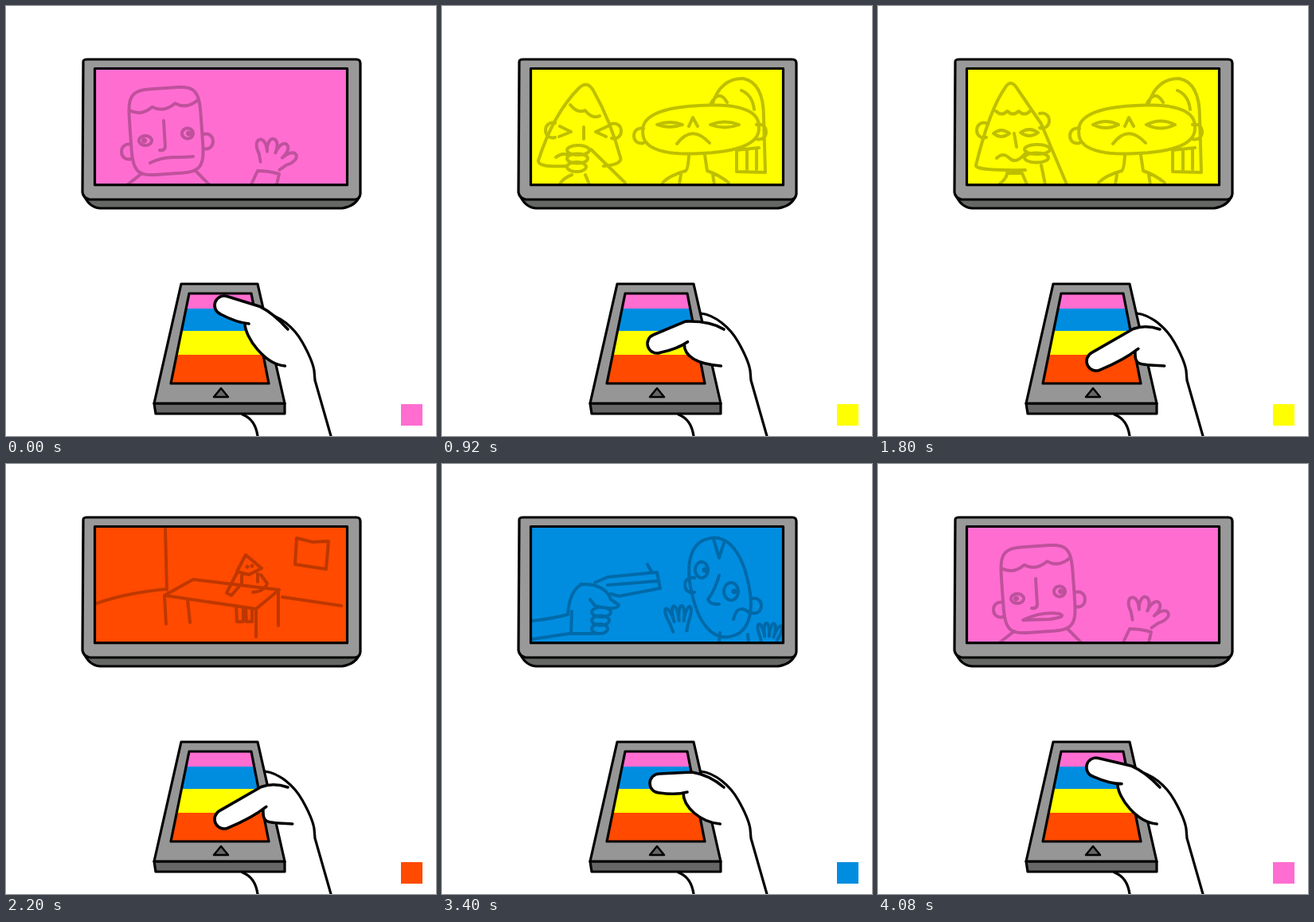
An HTML page for the animation above (4.16 s loop, 540x540 px).

```html
<!DOCTYPE html>
<html lang="en">
<head>
<meta charset="utf-8">
<title>Remote and screen</title>
<style>
html, body { margin: 0; width: 100%; height: 100%; overflow: hidden; background: #fff; }
svg { display: block; width: 100vw; height: 100vh; }
path { stroke-linecap: round; stroke-linejoin: round; }
.ink { stroke: #000; stroke-width: 3.2; fill: none; }
#scenes { fill: none; stroke: #000; stroke-width: 4; opacity: .25; }
</style>
</head>
<body>
<svg viewBox="0 0 540 540">
  <clipPath id="tvClip"><path d="M111 78.5H428.5V225H111Z"/></clipPath>
  <clipPath id="phoneClip"><path d="M230 361H308L330 474H207Z"/></clipPath>

  <path class="ink" style="fill:#656865" d="M97 236Q104 253 118 254H422Q440 251 444 238Z"/>
  <path class="ink" style="fill:#999" d="M97 70Q97 67 102 67H440Q445 67 445 72V236Q444 243 438 243H105Q97 241 96 234Z"/>
  <g clip-path="url(#tvClip)">
    <rect id="screen" x="111" y="78" width="318" height="148"/>
    <g id="scenes"></g>
  </g>
  <path class="ink" d="M111.5 78.5H428.5V224.7H111.5Z"/>

  <path class="ink" d="M325 386C343 388 362 404 372 422Q385 445 387 458L388 470 408 540M297 513Q313 519 316 540"/>
  <path class="ink" style="fill:#666" d="M186 499H350V512H188Z"/>
  <path class="ink" style="fill:#969696" d="M220 349H316L350 499H186Z"/>
  <g id="bands" clip-path="url(#phoneClip)"></g>
  <path class="ink" d="M230 361H308L330 474H207Z"/>
  <path class="ink" style="fill:#666;stroke-width:2.5" d="M270 480L279 491H261Z"/>
  <path id="thumbFill" fill="#fff"/>
  <path id="thumb" class="ink" style="stroke-width:3.6"/>
  <rect id="badge" x="496" y="500" width="27" height="27"/>
</svg>
<script>
const $ = id => document.getElementById(id);
const rad = Math.PI / 180;

function make(tag, parent, attrs = {}) {
  const el = parent.appendChild(document.createElementNS('http://www.w3.org/2000/svg', tag));
  for (const name in attrs) el.setAttribute(name, attrs[name]);
  return el;
}

// Shape helpers return path data

// Superellipse: power 2 is an oval, higher is boxier
function blob(x, y, rx, ry, power = 2, turn = 0) {
  const bend = v => Math.sign(v) * Math.abs(v) ** (2 / power);
  const c = Math.cos(turn * rad), s = Math.sin(turn * rad);
  let d = '';
  for (let a = 0; a < 360; a += 6) {
    const px = rx * bend(Math.cos(a * rad)), py = ry * bend(Math.sin(a * rad));
    d += `${a ? 'L' : 'M'}${x + px * c - py * s} ${y + px * s + py * c}`;
  }
  return d + 'Z';
}

const eye = (x, y, rx, ry, look) => blob(x, y, rx, ry) + blob(x + look, y, 1.5, 1.5);
const lens = (x, y, w, h) => `M${x - w} ${y}q${w} ${-2 * h} ${2 * w} 0q${-w} ${2 * h} ${-2 * w} 0Z`;
const ear = (x, y, side) => `M${x} ${y - 9}c${side * 16} -4 ${side * 16} 22 0 18`;

// A row of n arcs, hanging down by depth
function scallops(x, y, dx, dy, n, depth) {
  return `M${x} ${y}` + `q${dx / n / 2} ${dy / n / 2 + depth} ${dx / n} ${dy / n}`.repeat(n);
}

// An open hand: n fingers spread around a wrist
function hand(x, y, r, n, from, to) {
  const at = (deg, k) => `${x + r * k * Math.cos(deg * rad)} ${y + r * k * Math.sin(deg * rad)} `;
  const half = (to - from) / (n - 1) / 2;
  let d = 'M' + at(from - 2 * half, .35);
  for (let i = 0; i < n; i++) {
    const a = from + 2 * half * i;
    d += 'L' + at(a - half, .58) + 'C' + at(a - half, 1.13) + at(a + half, 1.13) + at(a + half, .58);
  }
  return d + 'L' + at(to + 2 * half, .35);
}

// Curled fingers stacked below each other
function knuckles(x, y, n, rx) {
  return Array.from({ length: n }, (_, i) => blob(x - i, y + 10.5 * i, rx - i, 6)).join('');
}

function scene(color, end) {
  return { color, end, group: make('g', $('scenes')) };
}
const sketch = (place, ...shapes) => make('path', place.group, { d: shapes.join('') });

const pink = scene('#ff6dd1', 840);
const yellow = scene('#ff0', 1880);
const orange = scene('#ff4a00', 2960);
const blue = scene('#008de0', 4000);
const scenes = [pink, yellow, orange, blue];

sketch(pink,
  blob(201, 157, 45, 54, 5, -4), scallops(155, 131, 86, -13, 3, 10),
  ear(157, 183, -1), ear(248, 170, 1),
  eye(175, 169, 8, 6, -1.5), eye(228, 160, 7, 6.5, 1.5),
  'M198 144L200 177Q199 182 193 181',
  'M171 210L153 224M239 208L255 224',
  hand(329, 207, 42, 4, -105, -30),
  'M316 207Q330 207 343 211L340 224M316 207L308 224');
const shut = sketch(pink, 'M181 197Q195 190 210 190T235 189');
const open = sketch(pink, 'M182 196Q205 185 228 188Q238 192 215 195Z');

const chew = sketch(yellow,
  'M155 201Q120 203 121 194Q140 135 172 103Q182 93 190 106Q212 145 224 190Q227 199 203 201',
  scallops(161, 124, 37, 14, 2, 8),
  ear(142, 156, -1), ear(213, 157, 1),
  'M148 151L162 158 147 164M208 151L193 158 206 164M178 152V167',
  'M143 190Q150 184 158 187', knuckles(171, 181, 3, 14),
  'M187 180L230 222M163 212Q152 216 148 224M180 212L185 224');
const rest = sketch(yellow,
  'M185 206Q122 207 123 200Q140 130 160 102Q167 91 175 104L205 148 237 224',
  scallops(148, 132, 43, 0, 3, 7),
  ear(136, 156, -1), ear(203, 144, 1),
  lens(155, 160, 10, 4), lens(190, 159, 11, 4), 'M171 160L174 177',
  'M149 191Q157 183 165 191T184 186', knuckles(200, 180, 2, 16),
  'M205 200L210 224M163 206Q163 216 152 224M162 210H181L187 224');
sketch(yellow,
  blob(325, 155, 73, 30, 2.5, -3), ear(253, 163, -1), ear(395, 158, 1),
  'M310 151L315 140 321 151M295 173Q314 148 336 172',
  'M310 187Q309 205 306 207Q285 213 277 222M330 187L333 207Q348 212 360 222',
  'M300 212L298 224M340 212L342 224',
  // Ponytail
  'M340 122Q350 91 378 91Q404 96 404 140L406 209 370 208V181L398 178',
  'M338 122Q348 104 358 121M376 106Q390 112 392 130M383 181V205M395 179V205');
const squint = sketch(yellow, lens(286, 149, 16, 3), lens(355, 149, 18, 3.5));
const stare = sketch(yellow, lens(286, 149, 16, 4), lens(355, 149, 18, 4.5));

sketch(orange,
  'M200 81L202 158M114 175Q150 162 202 157M347 167L421 178',
  'M199 165L235 145 343 158 314 182Z',
  'M199 165L201 201M228 170L231 199M314 182V217M342 159V203',
  'M365 93L385 98 405 97 402 132 363 126Z',
  'M289 178L290 198H298V180M301 180L302 198H309V181');
const worker = sketch(orange,
  'M301 114L290 135 305 139 321 131Z', blob(303, 129, .5, .5), blob(309, 128, .5, .5),
  'M290 137Q283 150 277 162L283 165 296 150V140M320 139L328 150Q325 160 310 161M316 138V148');

const gun = sketch(blue,
  'M113 197Q140 194 158 189Q160 160 174 152M113 220L160 213M163 185L162 213',
  'M192 149L208 142 270 136 274 156 222 166 212 163M208 152L271 147M258 126L263 135',
  'M174 151Q205 150 212 170L222 177Q220 185 192 178L186 170',
  knuckles(200, 186, 3, 12), 'M160 213H192');
sketch(blue,
  blob(349, 155, 36, 63, 2.3, -13), 'M341 94L348 118 355 96',
  eye(326, 133, 8, 10, 4), eye(363, 160, 9, 11, 4),
  'M348 140Q343 158 334 170Q337 177 348 176M366 195Q371 174 386 187',
  ear(317, 152, -1), ear(389, 178, 1),
  'M349 212L348 224M384 214L385 224');
const palms = sketch(blue, hand(300, 224, 47, 4, -114, -76), hand(409, 240, 41, 4, -106, -65));

[[pink, 355], [blue, 380], [yellow, 408], [orange, 438]].forEach(([s, y]) =>
  make('rect', $('bands'), { x: 200, y, width: 140, height: 90, fill: s.color }));

// Thumb poses: tip x, tip y, turn in degrees, visible length
const onPink = [274, 376, 20, 37], sliding = [262, 400, -3, 49], onYellow = [270, 424, -20, 37];
const onOrange = [274, 446, -28, 54], lifting = [272, 416, -12, 44], onBlue = [273, 401, 0, 35];
const moves = [
  [-100, onPink], [600, onPink], [680, sliding], [840, onYellow],
  [1640, onYellow], [1800, onOrange], [2680, onOrange], [2840, lifting],
  [2920, onBlue], [3880, onBlue], [4080, onPink], [4200, onPink]
];

function drawThumb(t) {
  const i = moves.findIndex(m => m[0] > t);
  const [t0, from] = moves[i - 1], [t1, to] = moves[i];
  const [x, y, turn, reach] = from.map((v, n) => v + (to[n] - v) * (t - t0) / (t1 - t0));
  const c = Math.cos(turn * rad), s = Math.sin(turn * rad);
  const at = (px, py) => [x + px * c - py * s, y + px * s + py * c];
  const top = at(reach + 6, -14), fold = at(reach - 5, 12);
  const outline = `M354 406Q336 ${top[1] / 2 + 197} ${top}L${at(0, -12)}` +
    `A12 12 0 0 0 ${at(0, 12)}Q${at(reach * .6, 15)} ${at(reach, 11)}`;
  const crease = `${fold}C${fold[0]} ${fold[1] + 18} 325 450 ${330 + reach * .55} 452`;
  $('thumbFill').setAttribute('d', `${outline}L${crease}Z`);
  $('thumb').setAttribute('d', `${outline}M${crease}`);
}

const show = (el, on) => el.style.display = on ? '' : 'none';
const shift = (el, x, y) => el.setAttribute('transform', `translate(${x} ${y})`);

function render(t) {
  const beat = Math.floor((t + 40) / 80);
  const odd = beat % 2;
  const now = scenes.find(s => t < s.end) || pink;
  for (const s of scenes) show(s.group, s === now);
  $('screen').setAttribute('fill', now.color);
  $('badge').setAttribute('fill', now.color);

  const talking = Math.floor(t / 80 + 1) % 52 % 3 !== 1;
  show(open, talking);
  show(shut, !talking);
  for (const el of [chew, squint]) show(el, !odd);
  for (const el of [rest, stare]) show(el, odd);
  shift(worker, 0, odd);
  shift(gun, odd - 1, 0);
  shift(palms, 0, 1 - odd);
  drawThumb(beat * 80 - 40);
}

const start = performance.now();
function tick() {
  render((performance.now() - start) % 4160);
  requestAnimationFrame(tick);
}
tick();
</script>
</body>
</html>
```
